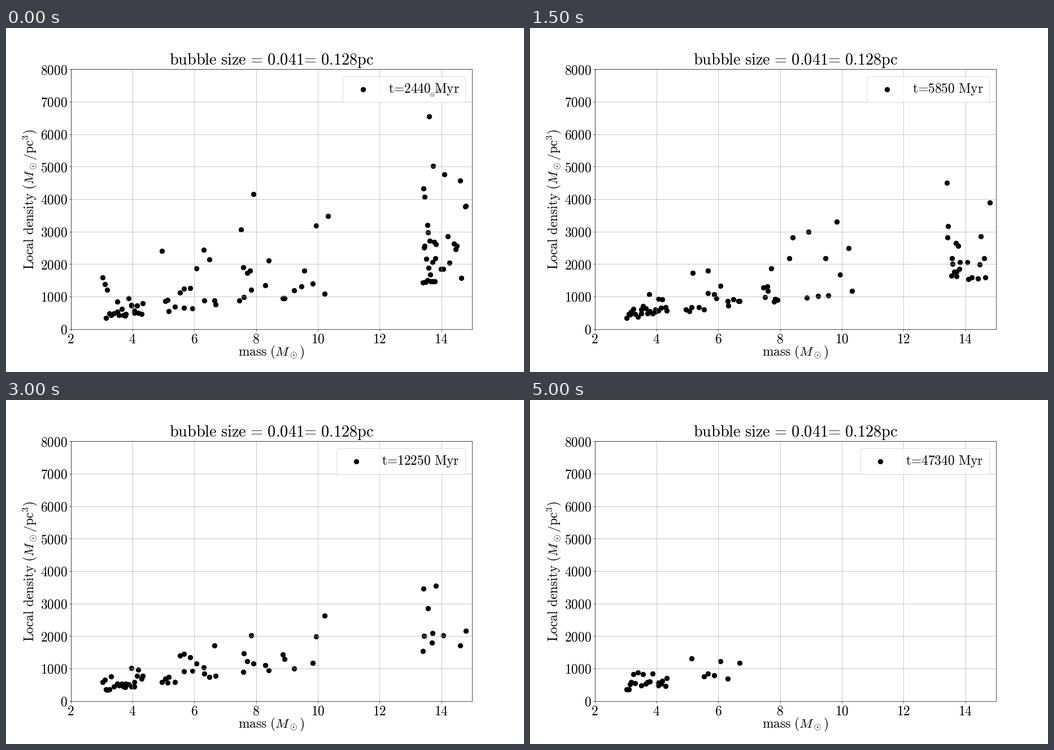
Animation of 917 by 611 pixels, one loop 5500 ms. Source, as a matplotlib script:

```python
import matplotlib.pyplot as plt
import numpy as np
from matplotlib.animation import FuncAnimation

W, H = 917, 611
DPI = W / 15
TEXT, TITLE = 27.7, 33.3
plt.rcParams["mathtext.fontset"] = "cm"

TIMES = [2440, 3630, 4580, 5850, 7470, 10010, 12250, 16750, 22910, 32930, 47340]

# Mass bands: lowest, highest, number of stars
LIGHT = [(3.03, 4.37, 23), (4.94, 6.72, 16), (7.45, 7.92, 8), (8.29, 10.33, 12)]
HEAVY = [(13.40, 13.82, 23), (13.92, 14.80, 13)]


def draw_masses(bands, rng):
    """Masses spread over the bands, each jittered about an even spacing."""
    groups = []
    for low, high, n in bands:
        jitter = rng.normal(0, 0.6 * (high - low) / n, n)
        groups.append(np.clip(np.linspace(low, high, n) + jitter, low, high))
    return np.concatenate(groups)


rng = np.random.default_rng(7)
light = draw_masses(LIGHT, rng)
heavy = draw_masses(HEAVY, rng)
# Order of escape, last to leave first; light stars tend to stay longer
light = light[np.argsort(light + rng.normal(0, 2.5, light.size))]
rng.shuffle(heavy)


def stars(step):
    """Mass and local density of every star still bound at this step."""
    n_light = round(light.size * (1 - 0.56 * (step / 10) ** 3))
    n_heavy = round(heavy.size * max(0, 1 - step / 9.5) ** 1.3)
    mass = np.concatenate([light[:n_light], heavy[:n_heavy]])

    # Density has a floor proportional to mass; the scatter above it settles
    calm = min(step / 5, 1)
    rng = np.random.default_rng(step + 20)
    spread = np.clip(rng.normal(size=mass.size), -1.5, 1.6)
    excess = np.exp((1.05 - 0.35 * calm) * spread - 0.1 - 0.4 * calm)
    return np.column_stack([mass, 90 * mass * (1 + excess)])


def roman(text):
    """Upright Computer Modern text with unpadded equals signs."""
    text = text.replace(" ", r"\ ").replace("=", r"\hspace{-0.2}=\hspace{-0.2}")
    return rf"$\mathrm{{{text}}}$"


def time_label(step):
    return roman(f"t={TIMES[step]} Myr")


fig = plt.figure(figsize=(W / DPI, H / DPI), dpi=DPI, facecolor="white")
ax = fig.add_axes([0.125, 0.125, 0.775, 0.755])
ax.set(xlim=(2, 15), ylim=(0, 8000))
ax.set_xticks(range(2, 15, 2))
ax.set_yticks(range(0, 8001, 1000))
ax.xaxis.set_major_formatter("${x:.0f}$")
ax.yaxis.set_major_formatter("${x:.0f}$")
ax.tick_params(labelsize=TEXT)
ax.tick_params(axis="x", pad=5)
ax.grid(True)
ax.set_title(roman("bubble size = 0.041= 0.128pc"), fontsize=TITLE, pad=5)

fig.text(470 / W, 1 - 582 / H, r"$\mathrm{mass}\ (M_\odot)$",
         fontsize=TEXT, ha="center", va="baseline")
fig.text(49 / W, 1 - 304 / H, r"$\mathrm{Local\ density}\ (M_\odot/\mathrm{pc}^3)$",
         fontsize=TEXT, rotation=90, rotation_mode="anchor", ha="center", va="baseline")

dots = ax.scatter(*stars(0).T, s=100, color="black", label=time_label(0))
k = 30 / TEXT
legend = ax.legend(loc="upper right", fontsize=TEXT, borderpad=0.4 * k,
                   borderaxespad=0.5 * k, handlelength=2 * k, handletextpad=0.75 * k)


def update(step):
    dots.set_offsets(stars(step))
    legend.get_texts()[0].set_text(time_label(step))
    return dots, legend


anim = FuncAnimation(fig, update, frames=len(TIMES), interval=500, repeat=True)
plt.show()
```
